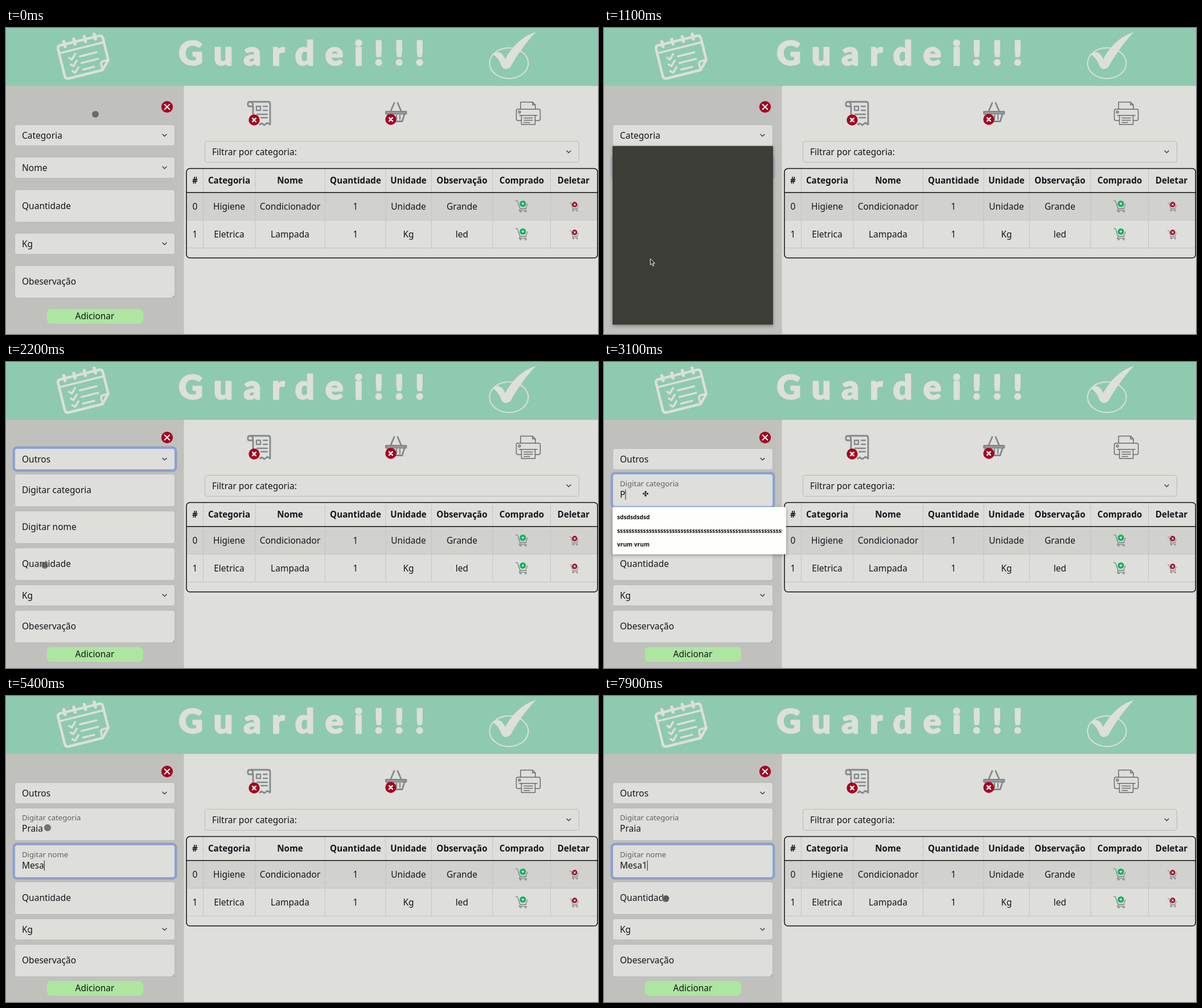
An HTML page that plays this animation: 1040 by 539 pixels, repeating every 8000 ms.

```html
<!DOCTYPE html>
<html lang="pt-BR">
<head>
<meta charset="utf-8">
<title>Lista de compras</title>
<style>
  html, body { margin: 0; width: 100%; height: 100%; overflow: hidden; background: #dedfda; }
  svg { display: block; width: 1040px; height: 539px; }
  text { font: 15.5px "Noto Sans", "Open Sans", sans-serif; fill: #14151b; white-space: pre; }
  .mid { text-anchor: middle; }
  .head { font-weight: 700; font-size: 15.2px; }
  .label { font-size: 13.15px; fill: #5f6164; }
  .hint { font-size: 10.2px; font-weight: 600; fill: #111; }
  .title { font: 900 60px Lato, "Noto Sans", sans-serif; letter-spacing: 18.5px; fill: #dedfda;
           stroke: #dedfda; stroke-width: 1.5; stroke-linejoin: round; }
  .line { fill: none; stroke-linecap: round; stroke-linejoin: round; }
  .pale { stroke: #dedfda; }
  .grey { stroke: #84878b; }
</style>
</head>
<body>
<svg viewBox="0 0 1040 539">
  <defs>
    <filter id="shadow" x="-10%" y="-10%" width="120%" height="125%">
      <feDropShadow dx="0" dy="2" stdDeviation="3" flood-opacity=".35"/>
    </filter>
    <clipPath id="hintClip"><rect x="15" y="255" width="298" height="84"/></clipPath>
    <g id="cross" class="line" stroke="#fff">
      <circle r="10.2" fill="#a50320" stroke="none"/>
      <path d="M-4.300-4.300L4.300 4.300M4.300-4.300L-4.300 4.300" stroke-width="2"/>
    </g>
    <g id="badge" class="line" stroke="#fff">
      <circle r="9.700" fill="#a50320" stroke="none"/>
      <path d="M-2.800-2.800L2.800 2.800M2.800-2.800L-2.800 2.800" stroke-width="2.600"/>
    </g>
    <g id="cart" class="line" stroke="#8d9092" stroke-width="1.5">
      <path d="M-10.500-9.500h3l5 14h10.500M-6-4l3 8h10l3-8M-2.500 4.500l-2 3H8"/>
      <circle cx="-2" cy="9" r="1.300"/><circle cx="7" cy="9" r="1.300"/>
    </g>
  </defs>

  <rect width="1040" height="539" fill="#dedfda"/>
  <rect width="1040" height="102" fill="#8ecab0"/>
  <rect y="102" width="312.500" height="437" fill="#c0c0bc"/>

  <g class="line pale" transform="translate(135.500 48.500) rotate(-14)" stroke-width="4.500">
    <path d="M-35-27H35Q41-27 41-21V18L27 33H-34Q-40 33-40 27V-21Q-40-27-35-27"/>
    <path d="M-40-14H41" stroke-width="3.500"/>
    <path d="M27 33V23Q27 18 32 18H41" stroke-width="3.500"/>
    <path d="M-27-32v9M-9-32v9M10-32v9M28-32v9" stroke-width="5.500"/>
    <path d="M-25-2l4 4 8-8M-25 10l4 4 8-8M-25 22l4 4 8-8M-6 0H24M-6 12H24M-6 24H14" stroke-width="3.500"/>
  </g>
  <text class="title" x="303" y="66">Guardei!!!</text>
  <ellipse class="line pale" cx="883.500" cy="62" rx="34" ry="27" stroke-width="2"/>
  <path fill="#dedfda" d="M855 46Q869 36 877 55C889 32 908 14 931 7C911 28 897 49 886 69Q877 76 871 68Q866 53 855 46Z"/>

  <g class="line grey" stroke-width="2.800">
    <path d="M434 152V138H427Q425 138 425 135V133Q425 130 429 130H461Q464 130 464 134V170L459 167L454 171L449 168L446 170M429 130Q434 130 434 138"/>
    <path d="M440 138h7v7h-7zM452 138h7M452 145h7M441 152h18M448 158h11" stroke-width="2.300"/>
    <path d="M667.500 147.500H703V151H667.500ZM670 152L675 164.500H696L700 152M676 146L682 132M694 146L688 132"/>
    <path d="M680 154v7M686 154v7M692 154v7" stroke-width="2.300"/>
  </g>
  <g class="line" stroke="#686b6e" stroke-width="1.500">
    <path d="M904 143V130.500H925L930 135.500V143M925 130.500V135.500H930"/>
    <path d="M905 163H899Q896.500 163 896.500 160V146Q896.500 143 899 143H936Q938.500 143 938.500 146V160Q938.500 163 936 163H930M902 154H933"/>
    <path d="M905.500 154V170H929.500V154M910 158.500H925M910 162.500H925M910 166.500H920"/>
    <circle cx="902" cy="148" r="1.800"/>
  </g>
  <use href="#badge" x="436" y="162"/>
  <use href="#badge" x="676" y="161"/>

  <g id="table"></g>
  <g id="form"></g>
  <g id="pointer"></g>
</svg>
<script>
const LOOP = 8000, STEP = 100;
const el = id => document.getElementById(id);
const pen = document.createElement('canvas').getContext('2d');
pen.font = '15.5px "Noto Sans", "Open Sans", sans-serif';

const text = (x, y, s, cls = '') => `<text x="${x}" y="${y}" class="${cls}">${s}</text>`;
const chevron = (x, y) =>
  `<path class="line" d="M${x - 3.5} ${y - 1.7}l3.5 3.5 3.5-3.5" stroke="#343a40" stroke-width="1.4"/>`;
const box = (x, y, w, h, ring) => (ring
  ? `<rect x="${x - 2}" y="${y - 2}" width="${w + 4}" height="${h + 4}" rx="6" fill="none" stroke="#929fc8" stroke-width="4"/>` : '') +
  `<rect x="${x}" y="${y}" width="${w}" height="${h}" rx="4" fill="#dedfda" stroke="${ring ? '#86a8e4' : '#b7babd'}"/>`;

function select(y, s, ring, x = 15.5, w = 281) {
  return box(x, y, w, 37, ring) + text(x + 12.5, y + 24, s) + chevron(x + w - 18, y + 18.5);
}

function input(y, label, value = '', ring = false) {
  const base = box(15.5, y, 281, 57, ring);
  if (!value && !ring) return base + text(28, y + 33.5, label);
  const caret = 28.5 + pen.measureText(value).width;
  return base + text(28, y + 21.5, label, 'label') + text(28, y + 41.5, value) +
    (ring ? `<path d="M${caret} ${y + 27}v18" stroke="#222"/>` : '');
}

const grip = y => `<path d="M292 ${y}l4-4M294.5 ${y}l1.5-1.5" stroke="#777" stroke-width=".8"/>`;
const button = y => `<rect x="71.5" y="${y}" width="169.5" height="26" rx="8" fill="#ade6a0"/>` +
  text(156, y + 18, 'Adicionar', 'mid');
const close = y => `<use href="#cross" x="283" y="${y}"/>`;

function drawTable() {
  const mids = [332, 392, 499, 614, 707, 801, 906, 997];
  const edges = [346.5, 438, 560.5, 667, 747.5, 855, 956.5];
  const heads = ['#', 'Categoria', 'Nome', 'Quantidade', 'Unidade', 'Observação', 'Comprado', 'Deletar'];
  const rows = [
    ['0', 'Higiene', 'Condicionador', '1', 'Unidade', 'Grande'],
    ['1', 'Eletrica', 'Lampada', '1', 'Kg', 'led']];
  const cells = (list, y, cls) => list.map((s, i) => text(mids[i], y, s, cls)).join('');
  let out = select(199.5, 'Filtrar por categoria:', false, 349.5, 657);
  out += '<rect x="318" y="290" width="721" height="48.5" fill="#d1d2cd"/>';
  out += `<path d="${edges.map(x => `M${x} 248V388`).join('')}M318 338.5H1039M318 387.5H1039" stroke="#c3c5c2"/>`;
  out += '<path d="M317 289.700H1039" stroke="#111" stroke-width="1.5"/>';
  out += '<rect x="317" y="247.5" width="722.3" height="157.5" rx="6" fill="none" stroke="#111" stroke-width="1.5"/>';
  out += cells(heads, 274, 'mid head');
  rows.forEach((row, i) => {
    const y = 314 + 49 * i;
    out += cells(row, y + 5.5, 'mid');
    out += `<use href="#cart" x="906" y="${y}"/><circle cx="908" cy="${y - 4.5}" r="5.5" fill="#08b257"/>
      <path d="M905.5 ${y - 4.5}h5M908 ${y - 7}v5" stroke="#fff" stroke-width="1.2"/>
      <use href="#cart" transform="translate(998 ${y + 1}) scale(.74)"/>
      <use href="#badge" transform="translate(999 ${y - 3}) scale(.48)"/>`;
  });
  el('table').innerHTML = out;
}

function firstForm(t) {
  const open = t >= 600;
  return close(139) + select(170.5, 'Categoria', t >= 500 && !open) +
    `<g opacity="${open ? 0.5 : 1}">${select(227.5, 'Nome', open)}</g>` +
    input(285, 'Quantidade') + select(361.5, 'Kg') + input(418.5, 'Obeservação') + grip(475) + button(495) +
    (open ? '<rect x="15" y="208" width="282" height="314.5" fill="#3c3c37" filter="url(#shadow)"/>' : '');
}

// Latest entry whose start time has passed.
const at = (steps, t) => steps.reduce((v, s) => (t >= s[0] ? s[1] : v), '');
const category = [[3000, 'P'], [3200, 'Pr'], [3500, 'Pra'], [3600, 'Prai'], [3800, 'Praia']];
const item = [[4700, 'M'], [5000, 'Me'], [5400, 'Mesa'], [7000, 'Mesa1']];
const focus = [[1600, 'select'], [2300, 'category'], [4100, 'item']];

function hints() {
  return '<rect x="15" y="255.5" width="305" height="83" rx="2" fill="#fefefc" filter="url(#shadow)"/><g clip-path="url(#hintClip)">' +
    ['sdsdsdsdsd', 's'.repeat(64), 'vrum vrum'].map((s, i) => text(23, 276.5 + 24.2 * i, s, 'hint')).join('') + '</g>';
}

function secondForm(t) {
  const on = at(focus, t);
  return close(133) + select(152.5, 'Outros', on === 'select') +
    input(197.5, 'Digitar categoria', at(category, t), on === 'category') +
    input(262.5, 'Digitar nome', at(item, t), on === 'item') +
    input(327.5, 'Quantidade') + select(392.5, 'Kg') + input(437.5, 'Obeservação') + grip(494) + button(502) +
    (t >= 2500 && t < 3300 ? hints() : '');
}

// Pointer stops: time, x, y; a fourth value glides on to the next stop.
const path = [
  [0, 157, 152], [200, 152, 189], [500, 148, 199], [600, 144, 205], [700, 144, 205, 1],
  [1300, 50, 507], [1700, 50, 488], [1800, 50, 467], [2000, 52, 440, 1],
  [2500, 92, 235], [2800, 73, 232], [6100, 69, 308], [6300, 73, 360], [6400, 77, 404],
  [6600, 79, 404.5], [6800, 82, 405, 1], [7500, 98, 405], [7700, 104, 385], [7800, 106, 369], [7900, 108.5, 357]];

const shapes = {
  dot: '<circle r="6.5" fill="#4a4a4a" fill-opacity=".72" stroke="#eee" stroke-opacity=".65"/>',
  arrow: '<path d="M0 0V11L2.7 8.6L4.5 13L6.5 12.1L4.7 8H8Z" fill="#333" stroke="#eee"/>',
  move: '<path d="M-4 0H4M0-4V4M-1.3-3L0-4.3L1.3-3M-1.3 3L0 4.3L1.3 3M-3-1.3L-4.3 0L-3 1.3M3-1.3L4.3 0L3 1.3" class="line" stroke="#111" stroke-width="1.2"/>'
};

function pointer(t) {
  const i = path.findLastIndex(p => t >= p[0]);
  let [t0, x, y, glide] = path[i];
  if (glide) {
    const [t1, x1, y1] = path[i + 1], k = (t - t0) / (t1 - t0);
    x += (x1 - x) * k;
    y += (y1 - y) * k;
  }
  const kind = t >= 600 && t < 1600 ? 'arrow' : t >= 2800 && t < 3500 ? 'move' : 'dot';
  return `<g transform="translate(${x} ${y})">${shapes[kind]}</g>`;
}

let shown = -1;
function tick(now) {
  const t = Math.floor((now % LOOP) / STEP) * STEP;
  if (t !== shown) {
    shown = t;
    el('form').innerHTML = t < 1600 ? firstForm(t) : secondForm(t);
    el('pointer').innerHTML = pointer(t);
  }
  requestAnimationFrame(tick);
}

drawTable();
tick(0);
</script>
</body>
</html>
```
